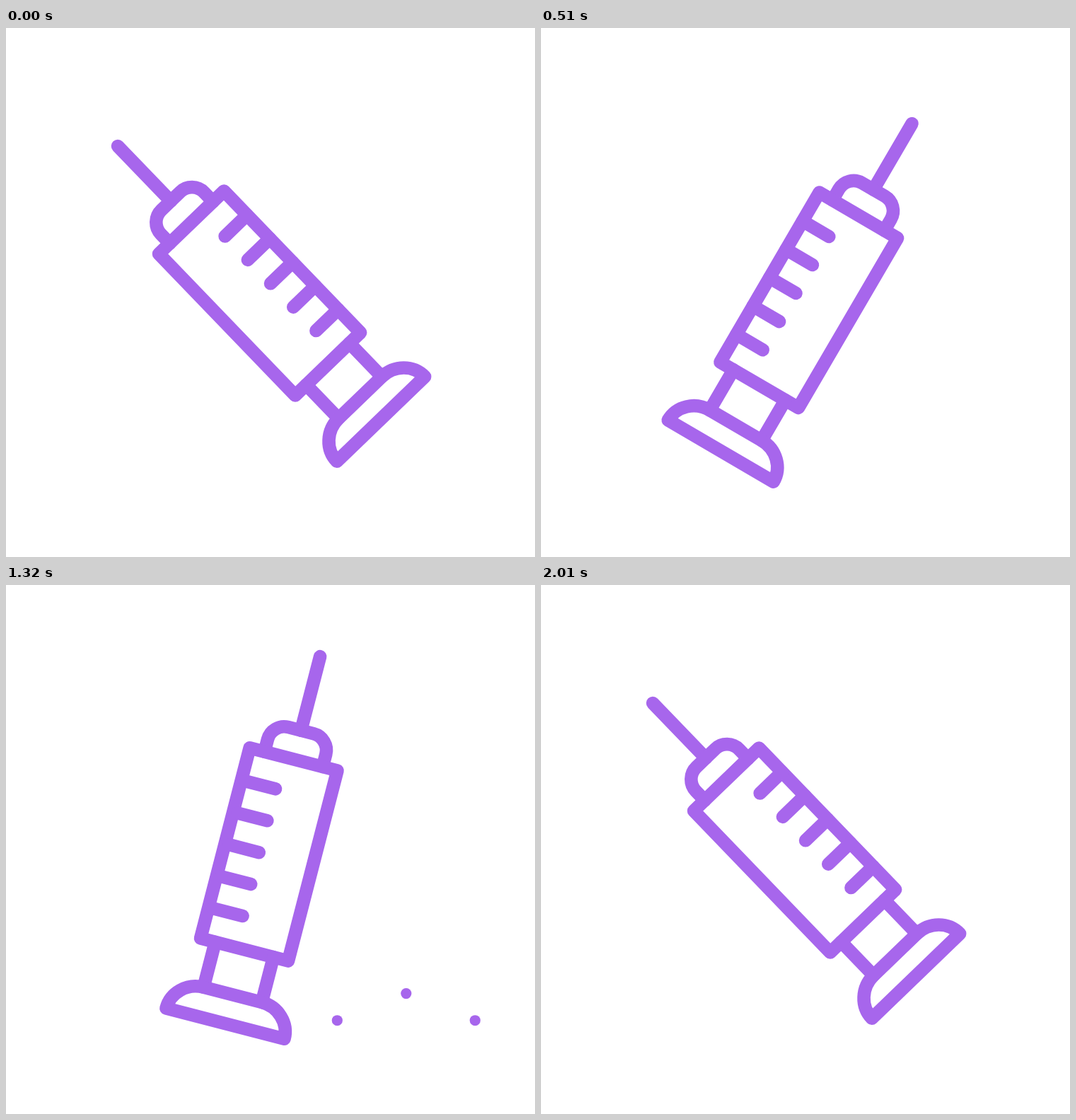
Recreate the animation shown at these times as an HTML page with a canvas. Size 748 by 748 pixels, loop 2.07 s.

```html
<!DOCTYPE html>
<html lang="en">
<head>
<meta charset="utf-8">
<title>Syringe</title>
<style>
html, body { margin: 0; height: 100%; overflow: hidden; background: #fff; }
canvas { display: block; width: 100vmin; height: 100vmin; }
</style>
</head>
<body>
<canvas id="stage" width="748" height="748"></canvas>
<script>
const LOOP = 2070, STEP = 30, LAST = 2010;
const ctx = document.getElementById('stage').getContext('2d');

// Pivot poses: time, x, y, degrees
const poses = [
  [0, 377.1, 407.2, -43.95],
  [198, 355.2, 439.5, -49.9],
  [600, 352.5, 407.2, 42.05],
  [1156, 353.6, 402.3, 42.46],
  [1605, 355.2, 439.5, -49.9],
  [LAST, 377.1, 407.2, -43.95]
];

// Eased progress from 0 to 1 between two times
function ease(t, from, to) {
  const u = Math.min(1, Math.max(0, (t - from) / (to - from)));
  return u * u * (3 - 2 * u);
}

function poseAt(t) {
  let i = 0;
  while (i < poses.length - 2 && t >= poses[i + 1][0]) i++;
  const a = poses[i], b = poses[i + 1], k = ease(t, a[0], b[0]);
  return a.map((v, j) => v + (b[j] - v) * k);
}

function stroke(d) {
  ctx.stroke(new Path2D(d));
}

function drawSyringe(t) {
  const [, x, y, deg] = poseAt(t);
  const push = 21 * (ease(t, 600, 770) - ease(t, 1130, 1300));
  const flip = ease(t, 283, 517) - ease(t, 1290, 1465);
  const tick = 20.7 - 84.9 * flip;
  const top = 226 - push, base = 268 - push;

  ctx.save();
  ctx.translate(x, y);
  ctx.rotate(deg * Math.PI / 180);
  ctx.translate(9, -57);
  ctx.lineWidth = 18.6;
  stroke('M0-268V-160');
  stroke('M-42.5-118V-136a24 24 0 0 1 24-24h37a24 24 0 0 1 24 24V-118');
  stroke('M-64-118H64V160H-64Z');
  for (let i = 0; i < 5; i++) stroke(`M${tick} ${-71 + 46.4 * i}h43.3`);
  stroke(`M-42.5 160V${top}M42.5 160V${top}`);
  stroke(`M-86.3 ${base}A44 42 0 0 1-42.5 ${top}H42.5A44 42 0 0 1 86.3 ${base}Z`);
  ctx.restore();
}

function drawDrop(t) {
  if (t <= 600 || t >= 1124) return;
  const grow = ease(t, 600, 930);
  const w = 20 * Math.sqrt(grow), h = 102 * grow;
  ctx.save();
  ctx.translate(580.5 - 10 * grow, 171 + 450 * ease(t, 898, 1124));
  ctx.lineWidth = 15;
  ctx.beginPath();
  ctx.moveTo(0, 0);
  ctx.bezierCurveTo(w * .5, h * .245, w, h * .53, w, h * .745);
  ctx.bezierCurveTo(w, h * .91, w * .65, h, 0, h);
  ctx.bezierCurveTo(-w * .65, h, -w, h * .91, -w, h * .745);
  ctx.bezierCurveTo(-w, h * .53, -w * .5, h * .245, 0, 0);
  ctx.closePath();
  ctx.stroke();
  ctx.restore();
}

function drawSplash(t) {
  if (t < 1124 || t >= 1370) return;
  const r = 158.5 * ease(t, 1120, 1367);
  for (const deg of [-42.8, 0, 42.8]) {
    const a = deg * Math.PI / 180;
    ctx.beginPath();
    ctx.arc(565.8 + r * Math.sin(a), 721 - r * Math.cos(a), 7.6, 0, 2 * Math.PI);
    ctx.fill();
  }
}

function frame(now) {
  const t = Math.min(LAST, Math.floor(now % LOOP / STEP) * STEP);
  ctx.fillStyle = '#fff';
  ctx.fillRect(0, 0, 748, 748);
  ctx.fillStyle = ctx.strokeStyle = '#a766ec';
  ctx.lineCap = ctx.lineJoin = 'round';
  drawSyringe(t);
  drawDrop(t);
  drawSplash(t);
}

const start = performance.now();
function loop() {
  frame(performance.now() - start);
  requestAnimationFrame(loop);
}
loop();
</script>
</body>
</html>
```
